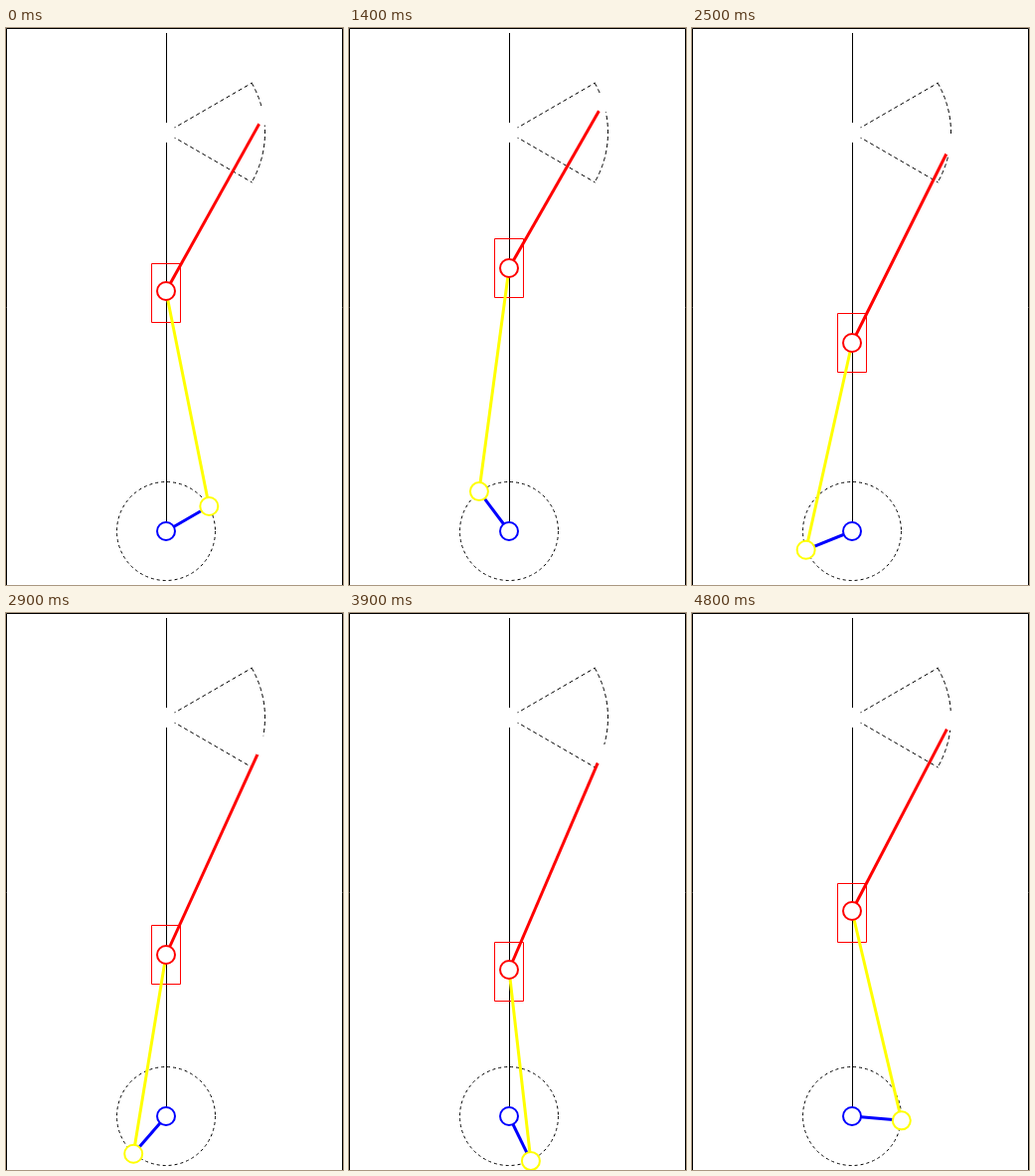
Recreate the animation shown at these times as an HTML page with a canvas. Size 339 px wide and 559 px high, loop 4900 ms.

```html
<!DOCTYPE html>
<html lang="en">
<head>
<meta charset="utf-8">
<title>Crank and slider</title>
<style>
html, body { margin: 0; width: 100%; height: 100%; overflow: hidden; background: #fff }
canvas { display: block }
</style>
</head>
<body>
<canvas id="stage" width="339" height="559"></canvas>
<script>
const ctx = document.getElementById('stage').getContext('2d');
const STEP = 100, STEPS = 49, X = 161;
const hub = [X, 505], pivot = [X, 105];

// [step, crank angle in degrees]: the crank turns slightly unevenly
const keys = [[0, 30], [7, 78], [14, 127], [20, 169], [29, 229], [39, 296], [48, 355]];

function crankAngle(step) {
  const i = Math.max(1, keys.findIndex(k => k[0] >= step));
  const [s0, a0] = keys[i - 1], [s1, a1] = keys[i];
  return Math.round(a0 + (a1 - a0) * (step - s0) / (s1 - s0));
}

function polar([x, y], r, deg) {
  const a = deg * Math.PI / 180;
  return [x + r * Math.cos(a), y - r * Math.sin(a)];
}

function stroke(color, width, dash = []) {
  ctx.strokeStyle = color;
  ctx.lineWidth = width;
  ctx.setLineDash(dash);
  ctx.stroke();
}

function line(a, b, color, width = 3, dash) {
  ctx.beginPath();
  ctx.moveTo(...a);
  ctx.lineTo(...b);
  stroke(color, width, dash);
}

function arc([x, y], r, from, to) {
  ctx.beginPath();
  ctx.arc(x, y, r, from, to);
}

// White disc with a coloured rim; a white rim leaves only a gap
function joint(p, color) {
  arc(p, 9, 0, 2 * Math.PI);
  ctx.fillStyle = '#fff';
  ctx.fill();
  stroke(color, 2);
}

function draw(step) {
  const angle = crankAngle(step);
  const drop = Math.abs((angle + 90) % 360 - 180);
  const rising = angle < 90 || angle > 270;
  const crank = polar(hub, 50, angle);
  const slider = [X, 204 + drop];
  const tip = polar(pivot, 100, 30 - drop / 3);

  ctx.fillStyle = '#fff';
  ctx.fillRect(0, 0, 339, 559);
  ctx.beginPath();
  ctx.rect(0.5, 0.5, 338, 600);
  stroke('#000', 1);
  ctx.fillStyle = '#000';
  ctx.fillRect(X, 5, 1, 500);

  arc(hub, 49.5, 0, 2 * Math.PI);
  stroke('#000', 1, [3, 3]);
  for (const a of [30, -30]) line(pivot, polar(pivot, 100, a), '#000', 1, [4, 3]);
  arc(pivot, 99.5, -Math.PI / 6, Math.PI / 6);
  stroke('#000', 1, [4, 3]);

  ctx.beginPath();
  ctx.rect(146.5, slider[1] - (rising ? 28 : 30) + 0.5, 29, 59);
  stroke('#f00', 1);

  line(hub, crank, '#00f');
  line(crank, slider, '#ff0');
  line(slider, tip, '#f00');

  joint(pivot, '#fff');
  joint(tip, '#fff');
  joint(hub, '#00f');
  joint(crank, '#ff0');
  joint(slider, '#f00');
}

const start = performance.now();
function tick() {
  draw(Math.floor((performance.now() - start) / STEP) % STEPS);
  requestAnimationFrame(tick);
}
tick();
</script>
</body>
</html>
```
